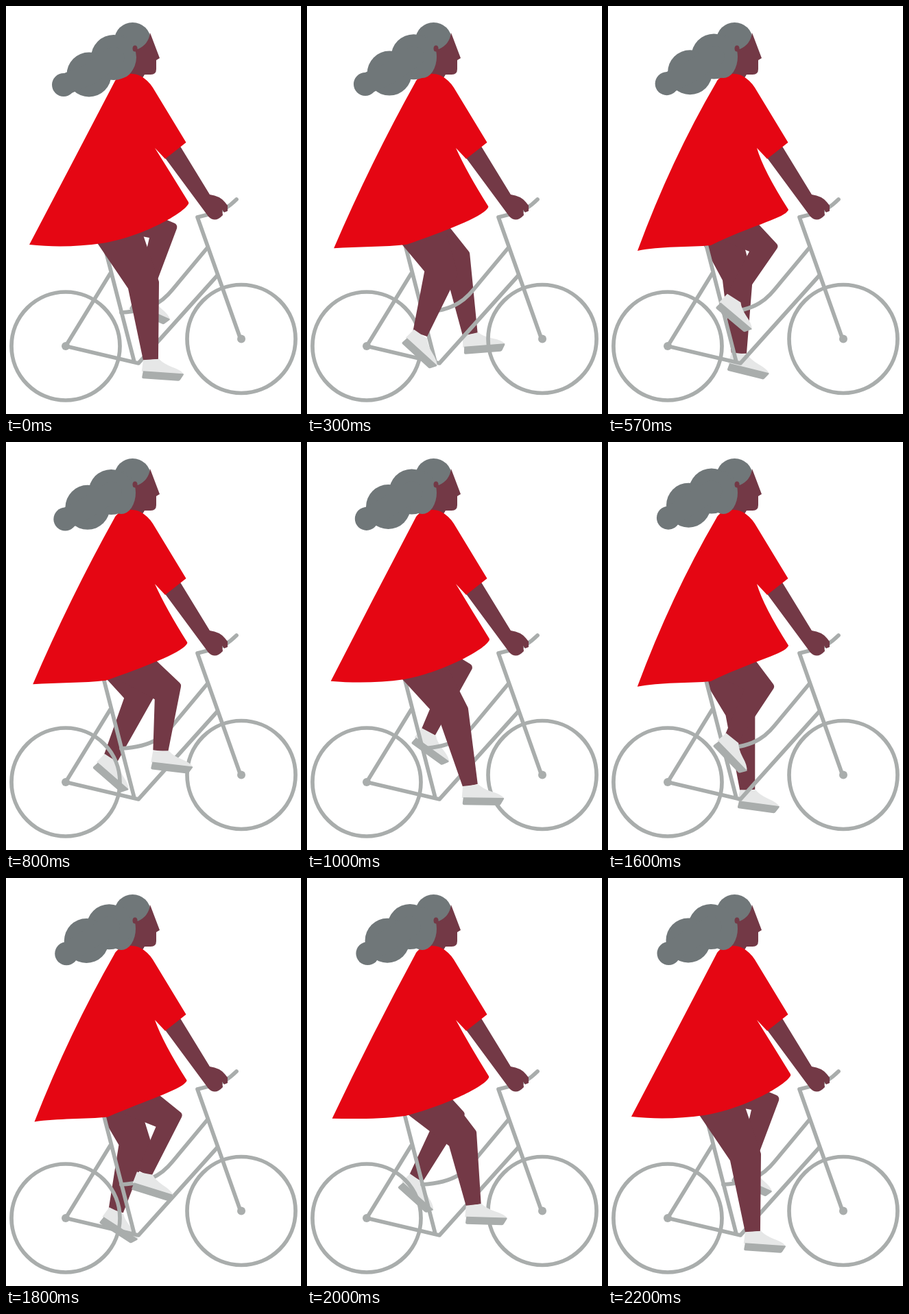
An HTML page with a canvas for the animation above (2270 ms loop, 430x595 px).

```html
<!DOCTYPE html>
<html lang="en">
<head>
<meta charset="utf-8">
<title>Cyclist</title>
<style>
html, body { margin: 0; width: 100%; height: 100%; overflow: hidden; background: #fff; }
canvas { display: block; width: 430px; height: 595px; }
</style>
</head>
<body>
<canvas id="stage" width="430" height="595"></canvas>
<script>
const ctx = document.getElementById('stage').getContext('2d');
const LOOP = 2270, STEPS = 44, TURN = 22;
const SKIN = '#733946', RED = '#e50613', HAIR = '#707779', STEEL = '#a9adac', SHOE = '#e6e7e7';

const mix = (a, b, u) => a + (b - a) * u;

// Every joint swings on an ellipse; c and s are cosine and sine of the pedal angle
const nearLeg = (c, s) => ({
  hipBack: [117, 322],
  hipFront: [191 - 5 * c, 293],
  front: [236 - 13 * c - 18 * s, 376 + 26 * c + 19 * s],
  back: [192 - 14 * c - 23 * s, 385 + 27 * c + 6 * s],
  ankle: [197 + 14 * c - 34 * s - 24 * s * c, 471 + 45 * c + 14 * s],
  tilt: 22 - 18 * c + 17 * s - 7 * s * c
});

const farLeg = (c, s) => ({
  hipBack: [125, 322],
  hipFront: [182, 290],
  front: [231 + 20 * c + 9 * s, 357 - 38 * c - 3 * s],
  back: [188 + 21 * c + 13 * s, 369 - 31 * c],
  ankle: [196 + 5 * c + 43 * s, 464 - 43 * c + 9 * s],
  tilt: 19 + 5 * c - 23 * s
});

function fill(path, color) {
  ctx.fillStyle = color;
  ctx.fill(new Path2D(path));
}

function line(path, width, color) {
  ctx.strokeStyle = color;
  ctx.lineWidth = width;
  ctx.stroke(new Path2D(path));
}

function oval(x, y, rx, ry, color) {
  ctx.fillStyle = color;
  ctx.beginPath();
  ctx.ellipse(x, y, rx, ry, 0, 0, 2 * Math.PI);
  ctx.fill();
}

function foot(x, y, tilt) {
  ctx.save();
  ctx.translate(x, y);
  ctx.rotate(tilt * Math.PI / 180);
  fill('M-11 1L12 -2Q18 4 31 8Q46 12 50 18H-12Z', SHOE);
  fill('M-10 17H48Q50 17 49 19L45 26Q44 28 42 28H-9Q-11 28 -11 26Z', STEEL);
  ctx.restore();
}

function leg({ hipBack, hipFront, front, back, ankle, tilt }) {
  const [x, y] = ankle;
  const dx = x - (front[0] + back[0]) / 2, dy = y - (front[1] + back[1]) / 2;
  const k = 11 / Math.hypot(dx, dy);
  ctx.fillStyle = SKIN;
  ctx.beginPath();
  ctx.moveTo(...hipBack);
  ctx.lineTo(...back);
  ctx.lineTo(x - dy * k, y + dx * k);
  ctx.lineTo(x + dy * k, y - dx * k);
  ctx.arcTo(...front, ...hipFront, 6);
  ctx.lineTo(...hipFront);
  ctx.fill();
  foot(x, y, tilt);
}

function wheel(x, y) {
  ctx.strokeStyle = STEEL;
  ctx.lineWidth = 5.7;
  ctx.beginPath();
  ctx.arc(x, y, 79, 0, 2 * Math.PI);
  ctx.stroke();
  oval(x, y, 6, 6, STEEL);
}

function bike() {
  wheel(87, 496);
  wheel(343, 485.5);
  line('M143 348L187 519M152 390L87 496L193 521L308 393', 5.7, STEEL);
  line('M168 447C222 444 234 424 254 400L294 352', 5.7, STEEL);
  line('M342 486L279 308L299 303Q318 300 336 282', 5.7, STEEL);
}

function head() {
  oval(184.5, 50, 26.5, 26, HAIR);
  fill('M210 39L224 76L219 79V92Q219 100 211 100H202L197 108H166' +
       'L175 70L188 60L192 63Q208 56 210 39Z', SKIN);
}

// Locks trail behind the head and lift as droop goes from 1 to 0
function locks(droop) {
  const mid = [mix(150, 157, droop), mix(71, 75, droop)];
  const low = [mix(117, 121, droop), mix(91, 100, droop)];
  const tip = [mix(88.5, 84, droop), mix(110, 115, droop)];
  oval(168, 74, 21, 31, HAIR);
  oval(...mid, 33, 33, HAIR);
  oval(...low, 32.5, 32.5, HAIR);
  oval(...tip, 17, 17, HAIR);
  line(`M${tip}L${low}L${mid}`, 31, HAIR);
  oval(188, 62, 3.5, 4.5, SKIN);
}

function arm() {
  fill('M230 219L253 203L297 275Q312 277 319 286L323 291V299L318 301L315 297' +
       'L316 305Q305 317 295 307Z', SKIN);
}

function dress(u) {
  const p = (x0, y0, x1, y1) => `${mix(x0, x1, u)} ${mix(y0, y1, u)} `;
  fill('M159 109C168 97 185 97 196 102Q207 108 214 119L262.5 199L232 223L217 207' +
       'Q' + p(242, 247, 226, 239) + p(266, 286, 263, 297) +
       'Q' + p(267, 288, 263, 298) + p(265, 290, 261, 300) +
       'C' + p(256, 304, 253, 310) + p(195, 338, 205, 322) + p(140, 346, 150, 349) +
       'C' + p(105, 351, 120, 352) + p(70, 352, 75, 350) + p(34, 348, 43, 357) +
       'Q' + p(96, 230, 92, 224) + '158 111Z', RED);
}

function draw(step) {
  const angle = 2 * Math.PI * step / TURN;
  const c = Math.cos(angle), s = Math.sin(angle);
  ctx.clearRect(0, 0, 430, 595);
  leg(farLeg(c, s));
  bike();
  leg(nearLeg(c, s));
  head();
  arm();
  dress((1 - c) / 2);
  locks(Math.pow(1 - step / STEPS, 1.6));
}

// Steps alternate between 70 ms and 30 ms
function tick() {
  const t = (performance.now() - start) % LOOP;
  draw(2 * Math.floor(t / 100) + (t % 100 >= 70 ? 1 : 0));
  requestAnimationFrame(tick);
}

ctx.lineCap = ctx.lineJoin = 'round';
const start = performance.now();
tick();
</script>
</body>
</html>
```
